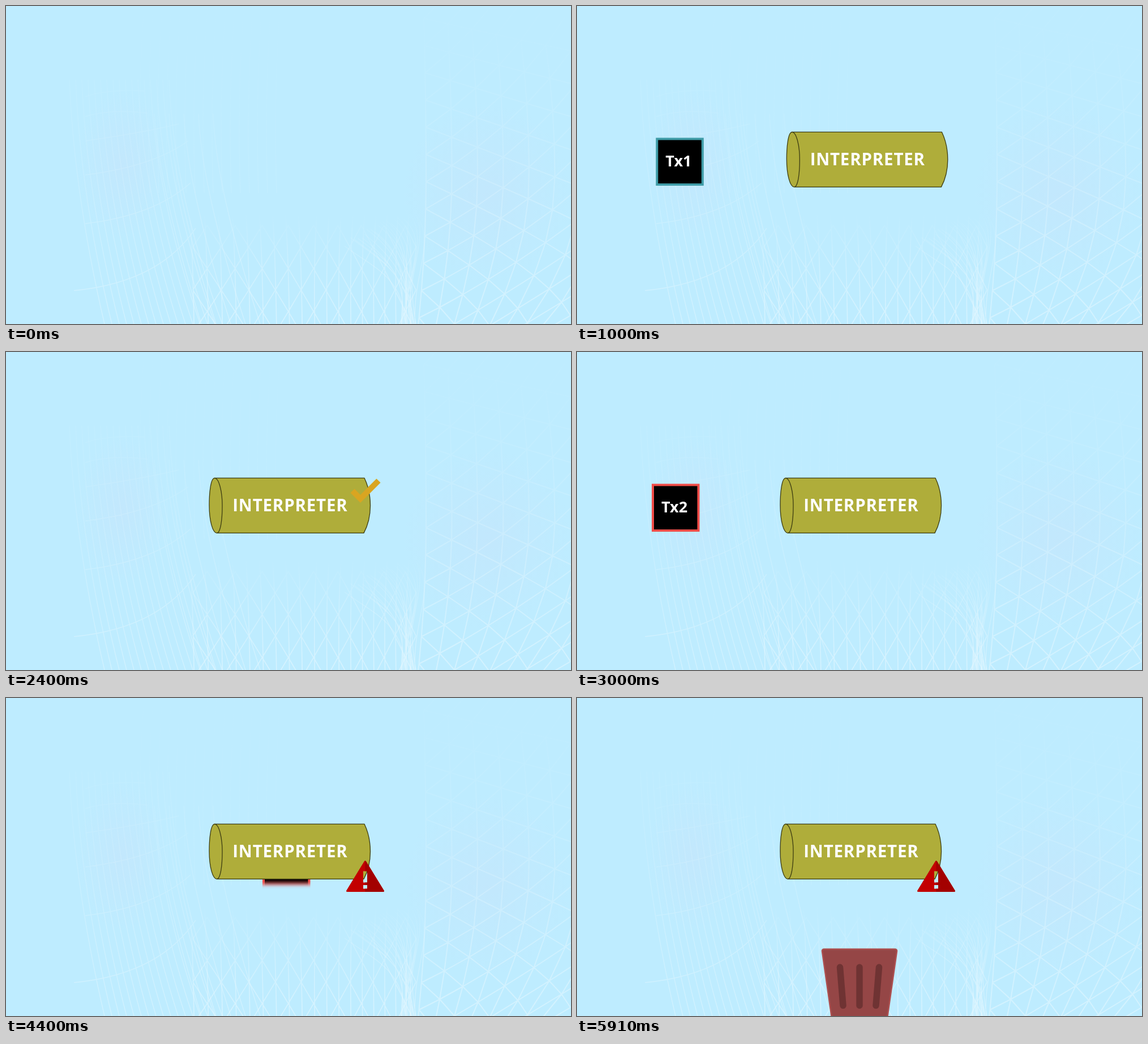
Animation of 998 by 561 pixels, one loop 6.21 s. Source, as an HTML page:

```html
<!DOCTYPE html>
<html lang="en">
<head>
<meta charset="utf-8">
<title>Interpreter</title>
<style>
  html, body { margin: 0; width: 100%; height: 100%; overflow: hidden; background: #beecff; }
  svg { display: block; width: 100vw; height: 100vh; }
  text { font-family: "Open Sans", "Noto Sans", sans-serif; font-weight: 700; fill: #fff; }
</style>
</head>
<body>
<svg viewBox="0 0 998 561">
  <defs>
    <linearGradient id="fade" gradientUnits="userSpaceOnUse" x1="0" y1="60" x2="0" y2="561">
      <stop offset="0" stop-color="#e4f7ff" stop-opacity="0.04"/>
      <stop offset="0.45" stop-color="#e4f7ff" stop-opacity="0.28"/>
      <stop offset="1" stop-color="#e4f7ff" stop-opacity="0.68"/>
    </linearGradient>
    <linearGradient id="rise" gradientUnits="userSpaceOnUse" x1="0" y1="365" x2="0" y2="561">
      <stop offset="0" stop-color="#e4f7ff" stop-opacity="0"/>
      <stop offset="0.45" stop-color="#e4f7ff" stop-opacity="0.45"/>
      <stop offset="1" stop-color="#e4f7ff" stop-opacity="0.8"/>
    </linearGradient>
    <radialGradient id="haze">
      <stop offset="0" stop-color="#c6e4fb" stop-opacity="0.55"/>
      <stop offset="1" stop-color="#c6e4fb" stop-opacity="0"/>
    </radialGradient>
    <radialGradient id="smoke">
      <stop offset="0" stop-color="#6f671c" stop-opacity="0.9"/>
      <stop offset="0.6" stop-color="#7d741f" stop-opacity="0.6"/>
      <stop offset="1" stop-color="#7d741f" stop-opacity="0"/>
    </radialGradient>
  </defs>

  <rect width="998" height="561" fill="#beecff"/>
  <ellipse cx="205" cy="280" rx="80" ry="130" fill="url(#haze)"/>
  <ellipse cx="850" cy="330" rx="150" ry="160" fill="url(#haze)"/>
  <g id="mesh" fill="none"></g>

  <g id="tx1">
    <rect x="2" y="234.5" width="80.5" height="80.5" fill="#000" stroke="#3f9ca7" stroke-width="4"/>
    <text x="17" y="283" font-size="27">Tx1</text>
  </g>
  <g id="tx2">
    <rect x="2" y="234.5" width="80.5" height="80.5" fill="#000" stroke="#f04c47" stroke-width="4"/>
    <text x="17" y="283" font-size="27">Tx2</text>
  </g>

  <g id="tube">
    <g fill="#afad3a" stroke="#3d3d12" stroke-width="1.3" stroke-linejoin="round">
      <path d="M368.5 222.3H633Q643.5 244 643.5 271T632 319.4H372.5Z"/>
      <path d="M368.5 222.3C362 222.5 359 245 359 270C359 298 365 319 372.5 319.4C379 319 382 296 382 271C382 245 376 222.5 368.5 222.3Z"/>
    </g>
    <text x="400.3" y="281" font-size="29.5" letter-spacing="0.8">INTERPRETER</text>
  </g>

  <g id="check">
    <circle id="puff" r="30" fill="url(#smoke)"/>
    <path d="M-23 3L-9 17L23 -15" fill="none" stroke="#d9a521" stroke-width="10"/>
  </g>

  <g id="alert">
    <g fill-rule="evenodd">
      <path d="M634.3 288.5L602.5 340.5H666.5Z" fill="#c20000" stroke="#c20000" stroke-width="3" stroke-linejoin="round" mask="url(#bang)"/>
      <path d="M634.3 287L636 288L668 340.5L666.8 342H634.3Z" fill="#a30000" mask="url(#bang)"/>
    </g>
    <mask id="bang" maskUnits="userSpaceOnUse" x="590" y="270" width="90" height="90">
      <rect x="590" y="270" width="90" height="90" fill="#fff"/>
      <path d="M631 305.5H638V325.5H631ZM631 330H638V336.5H631Z" fill="#000"/>
    </mask>
  </g>

  <g id="bin">
    <path d="M433 447Q432.3 443 437 443H561Q565.7 443 565 447L543 600H455Z" fill="#954646" stroke="#ad5050" stroke-width="2.4"/>
    <path d="M464.5 475L470 542.5M499 475V542.5M533.5 475L528 542.5" stroke="#6f3333" stroke-width="11.5" stroke-linecap="round"/>
  </g>
</svg>

<script>
const NS = "http://www.w3.org/2000/svg";
const LOOP = 6210, STEP = 200;
const $ = id => document.getElementById(id);
const clamp = (v, a, b) => Math.min(b, Math.max(a, v));

function add(parent, tag, attrs) {
  const el = document.createElementNS(NS, tag);
  for (const k in attrs) el.setAttribute(k, attrs[k]);
  return parent.appendChild(el);
}

let seed = 7;
const rand = () => (seed = seed * 16807 % 2147483647) / 2147483647;

// ---- background mesh ----
function drawMesh() {
  const mesh = $("mesh");
  const stroke = (d, paint, width, opacity) =>
    add(mesh, "path", { d, stroke: `url(#${paint})`, "stroke-width": width, opacity });
  const seg = (a, b) => `M${a[0].toFixed(1)} ${a[1].toFixed(1)}L${b[0].toFixed(1)} ${b[1].toFixed(1)}`;

  // triangular grid on the right
  const node = (i, j) => {
    const y = 310 + 21.5 * i + (48 + 2 * i) * j, dy = y - 300;
    const bend = (0.0002 + 0.0002 * Math.max(i, 0)) * dy * dy * (dy < 0 ? 0.25 : 1);
    return [742 + 45.5 * i - bend, y];
  };
  let grid = "";
  for (let i = 0; i < 8; i++)
    for (let j = -6; j < 6; j++) {
      const p = node(i, j);
      grid += seg(p, node(i, j + 1)) + seg(p, node(i + 1, j)) + seg(p, node(i + 1, j - 1));
    }
  stroke(grid, "fade", 2, 0.85);

  // diamond lattice along the bottom
  const knot = (k, m) => [330 + 25.5 * k - 0.2 * k * k, 425 + 38 * m];
  let lattice = "";
  for (let k = 0; k < 18; k++) {
    const [x] = knot(k, 0), lean = k < 9 ? 5 : -6;
    lattice += `M${x - lean} 365Q${x} 440 ${x + 2} 561`;
    for (let m = -1; m < 4; m++)
      lattice += (k + m) % 2 ? seg(knot(k, m + 1), knot(k + 1, m)) : seg(knot(k, m), knot(k + 1, m + 1));
  }
  stroke(lattice, "rise", 1.6, 0.8);

  // fan on the left
  let fan = "";
  for (let k = 0; k < 17; k++) {
    const x = 112 + 11 * k;
    fan += `M${x} 130Q${x + 8} 330 ${x + 62 + 2 * k} 561`;
  }
  for (let k = 0; k < 5; k++)
    fan += `M${262 + 26 * k} 190Q${270 + 25 * k} 320 ${345 + 26 * k} 561`;
  for (const [y, rise, end] of [[160, 10, 245], [195, 6, 250], [238, 30, 305], [298, 60, 322], [384, 72, 326], [502, 110, 335]])
    fan += `M${y > 400 ? 120 : 140} ${y}Q${end - 65} ${y - 14} ${end} ${y - rise}`;
  stroke(fan, "fade", 1.4, 0.75);

  // faint uprights at the top
  let bars = "";
  for (let k = 0; k < 16; k++) {
    const x = 232 + 16 * k;
    bars += `M${x + 12} 0Q${x} 160 ${x + 6} 330`;
  }
  stroke(bars, "fade", 1.5, 0.35);

  // swirl of strands
  let swirl = "";
  for (let k = 0; k < 20; k++) {
    const x = 598 + 6 * k + rand() * 8, y = 405 - 3 * k + rand() * 20, end = 696 + rand() * 30;
    swirl += `M${x} ${y}C${x + 45} ${y + 35} ${700 + rand() * 18} ${455 + rand() * 30} ${end} 561`;
  }
  stroke(swirl, "rise", 1.1, 0.85);
}

// ---- motion ----
const REST = 139.5;
const decay = (t, at, rate) => Math.exp(clamp(-(t - at) * rate, -20, 20));
const easeInOut = u => {
  u = clamp(u, 0, 1);
  return u < 0.5 ? 4 * u ** 3 : 1 - 4 * (1 - u) ** 3;
};
const enter = (t, start) => 313.5 * easeInOut((t - start) / 720);

const tx1X = t => REST - 5 * decay(t, 600, 0.0081) + enter(t, 1300)
  + 520 * Math.max(0, (t - 1800) / 400) ** 1.6;
const tx2X = t => REST - 7.5 * decay(t, 3000, 0.0099) + enter(t, 3300);
const tx2Y = t => 0.0035 * Math.max(0, t - 4340) ** 2;
const tubeX = t => 333 * decay(t, 600, 0.00845);
const binY = t => 90 * decay(t, 4600, 1 / 130);
const still = () => 0;

// Places a part and smears it along its velocity.
function mover(id, xAt, yAt, left) {
  const el = $(id);
  const filter = add(document.querySelector("defs"), "filter", {
    id: id + "Blur", filterUnits: "userSpaceOnUse", x: -300, y: -100, width: 1600, height: 900,
    "color-interpolation-filters": "sRGB"
  });
  const blur = add(filter, "feGaussianBlur", { stdDeviation: "0 0" });
  const smear = (f, t) => Math.abs(f(t + 2) - f(t - 2)) / 4 * 7.7;
  return t => {
    const x = xAt(t), y = yAt(t);
    const shown = x + left < 1060 && x > -150 && y < 400;
    el.setAttribute("visibility", shown ? "visible" : "hidden");
    if (!shown) return;
    const sx = smear(xAt, t), sy = smear(yAt, t);
    el.setAttribute("transform", `translate(${x.toFixed(2)} ${y.toFixed(2)})`);
    blur.setAttribute("stdDeviation", `${sx.toFixed(2)} ${sy.toFixed(2)}`);
    if (sx + sy > 0.15) el.setAttribute("filter", `url(#${id}Blur)`);
    else el.removeAttribute("filter");
  };
}

function scaleAt(id, cx, cy, s, offset) {
  const el = $(id);
  el.setAttribute("visibility", s ? "visible" : "hidden");
  el.setAttribute("transform", `translate(${cx} ${cy}) scale(${s || 1})` + (offset ? ` translate(${-cx} ${-cy})` : ""));
}

drawMesh();
const movers = [
  mover("tx1", tx1X, still, 0),
  mover("tx2", tx2X, tx2Y, 0),
  mover("tube", tubeX, still, 359),
  mover("bin", still, binY, 432)
];

function checkScale(t) {
  if (t < 1800 || t >= 2800) return 0;
  return t < 2000 || t >= 2600 ? 0.4 : 1;
}

function alertScale(t) {
  if (t < 4000) return 0;
  return t < 4200 ? 0.45 : t < 4400 ? 1.1 : 1;
}

function render(ms) {
  const t = Math.floor(ms % LOOP / STEP) * STEP;
  movers.forEach(move => move(t));
  const s = checkScale(t);
  scaleAt("check", 635, 242, s, false);
  $("puff").setAttribute("opacity", s < 1 ? 1 : 0);
  scaleAt("alert", 634.3, 317, alertScale(t), true);
}

const begin = performance.now();
function tick() {
  render(performance.now() - begin);
  requestAnimationFrame(tick);
}
tick();
</script>
</body>
</html>
```
